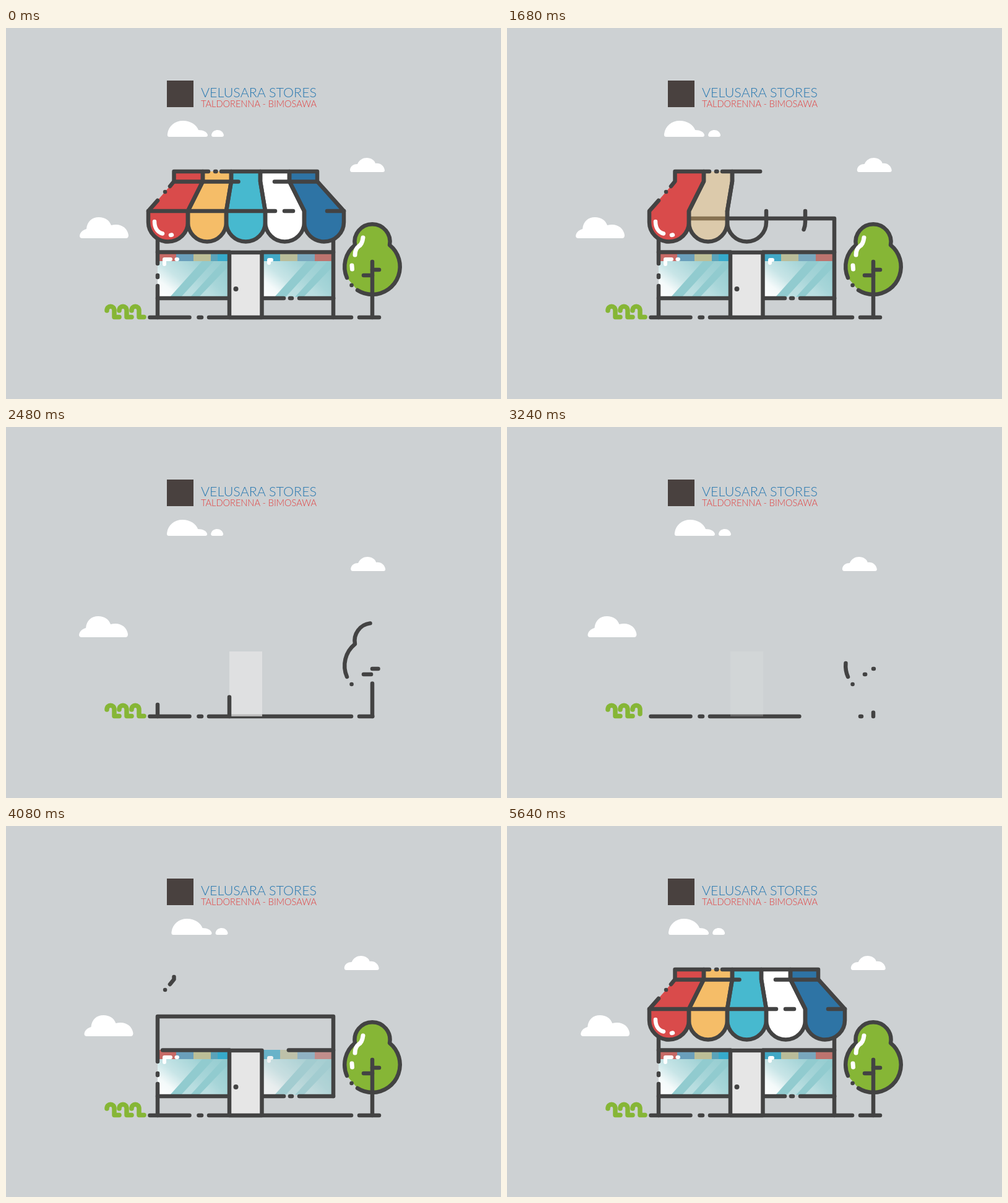
An HTML page that plays this animation: 800x600 px, repeating every 5680 ms.

```html
<!DOCTYPE html>
<html lang="en">
<head>
<meta charset="utf-8">
<title>Store front</title>
<style>
  html, body { margin: 0; width: 100%; height: 100%; overflow: hidden; background: #cdd1d3; }
  svg { display: block; width: 100%; height: 100%; }
  path { fill: none; stroke-linecap: round; stroke-linejoin: round; }
  text { font-family: Lato, "Open Sans", sans-serif; font-weight: 300; }
</style>
</head>
<body>
<svg id="stage" viewBox="0 0 800 600">
  <defs>
    <linearGradient id="shine" x1="0" y1="1" x2="1" y2="0">
      <stop offset="0" stop-color="#fff"/>
      <stop offset=".25" stop-color="#fff" stop-opacity=".9"/>
      <stop offset=".5" stop-color="#fff" stop-opacity=".5"/>
      <stop offset="1" stop-color="#fff" stop-opacity=".1"/>
    </linearGradient>
    <g id="glass">
      <rect width="113" height="73" fill="#91cbcf"/>
      <path d="M0 73V15H72L20 73Z" style="fill:url(#shine)"/>
      <path d="M38 73L91 15H106L53 73Z" style="fill:url(#shine)" opacity=".4"/>
      <path d="M67 73L113 25V73Z" style="fill:url(#shine)" opacity=".4"/>
    </g>
  </defs>
  <rect x="260" y="85" width="43" height="43" fill="#49413f"/>
  <text x="315" y="112" font-size="21.5" fill="#2878b0">VELUSARA STORES</text>
  <text x="315" y="128" font-size="14.6" fill="#e23b3b">TALDORENNA - BIMOSAWA</text>
</svg>
<script>
const LOOP = 5680;
const INK = "#434343", GREEN = "#86b636";
const stage = document.getElementById("stage");
const parts = [];
const clamp = x => Math.max(0, Math.min(1, x));

function make(tag, attrs, parent = stage) {
  const el = document.createElementNS("http://www.w3.org/2000/svg", tag);
  for (const key in attrs) el.setAttribute(key, attrs[key]);
  parent.appendChild(el);
  return el;
}

const shape = (d, color) => make("path", { d, style: "fill:" + color });

// Fades an element in over a span of build time.
function fade(el, start, span) {
  parts.push(b => el.setAttribute("opacity", clamp((b - start) / span)));
  return el;
}

// Draws pen strokes one after another over a span of build time.
function draw(list, start, span, color = INK, width = 6.5) {
  const lines = list.map(d => make("path", { d, stroke: color, "stroke-width": width }));
  const sizes = lines.map(l => l.getTotalLength());
  const total = sizes.reduce((a, n) => a + n, 0);
  parts.push(b => {
    let left = clamp((b - start) / span) * total + 0.001;
    const hidden = b <= start;
    lines.forEach((line, i) => {
      const size = sizes[i], part = Math.min(left, size);
      line.style.display = hidden || part <= 0 ? "none" : "";
      line.style.strokeDasharray = part >= size ? "none" : part + " 2000";
      left -= size;
    });
  });
}

// Clouds
const clouds = [
  [-0.0041, "M264 176Q260 176 261 171C263 158 273 150 286 150C299 150 308 157 311 165C319 165 325 168 326 173Q326 176 323 176Z" +
    "M335 176Q332 176 332 173C333 167 338 165 342 165C347 165 351 168 352 173Q352 176 349 176Z"],
  [0.0058, "M559 233Q556 233 556 229C557 223 562 220 568 220C571 213 577 210 583 210C590 210 596 214 597 219C605 218 611 223 612 230Q612 233 609 233Z"],
  [-0.0047, "M123 340Q119 340 119 336C120 330 124 327 130 325C131 313 139 306 150 306C160 306 167 311 170 319C184 315 196 322 198 335Q198 340 194 340Z"]
].map(([speed, d]) => ({ speed, el: shape(d, "#fff") }));

// Bush
draw([163, 183, 203].map(x => `M${x} 457C${x} 448 ${x + 12} 448 ${x + 12} 457V467.5H${x + 20}`), 0, 290, GREEN, 7.5);

// Tree
const crown = "M551 404A45 45 0 0 1 564 351A28.5 28.5 0 1 1 620 351A45 45 0 0 1 592 431A45 45 0 0 1 568 424";
fade(shape(crown + "Z", GREEN), 500, 250);
draw(["M558.5 416h.1", crown], 218, 560);
draw(["M592 468V378"], 240, 300);
draw(["M578 400H592"], 245, 200);
draw(["M592 391H603"], 245, 200);
draw(["M571 468H603"], 245, 260);
draw(["M559.5 390L559 384", "M564 367C564 361 566 356 570 353C574 351 576 347 577 339"], 700, 250, "#fff", 7);

// Windows
function pane(x, blinds, glint, start, span) {
  const g = fade(make("g", {}), start, span);
  make("use", { href: "#glass", x, y: 362 }, g);
  blinds.forEach(([from, to, color]) =>
    make("rect", { x: from, y: 362, width: to - from, height: 15, fill: color }, g));
  make("path", { d: glint, stroke: "#fff", "stroke-width": 6 }, g);
}
pane(245, [[245, 275, "#c76a66"], [275, 303, "#6a9fbb"], [303, 331, "#bcbe97"], [331, 342, "#5ba3b9"], [342, 358, "#36aacb"]],
  "M256 382V374H266M275.5 374h1.5", 680, 300);
pane(414, [[414, 443, "#42a8c6"], [443, 471, "#b9bc99"], [471, 499, "#79a7bd"], [499, 527, "#bd746f"]],
  "M425 380V375H429", 880, 310);

// Walls and ground
draw(["M245 468V417", "M245 403V400", "M245 381V308H529V437"], 400, 500);
draw(["M529 437V468"], 1220, 150);
draw(["M361 437H245"], 550, 300);
draw(["M529 437H474", "M462 437H459", "M449 437H414"], 600, 300);
draw(["M361 362.5H245"], 715, 415);
draw(["M529 362.5H414"], 850, 400);
draw(["M232.5 468H296.5", "M311.5 468H316", "M328 468H558"], 0, 366);

// Door
fade(make("rect", { x: 361, y: 363, width: 53, height: 105, fill: "#e6e6e6" }), 200, 300);
draw(["M361 468V363H413.5V468Z"], 380, 380);
fade(make("circle", { cx: 371.5, cy: 422, r: 4, fill: INK }), 650, 60);

// Awning
const high = [271.5, 318, 364, 411, 458, 503];
const low = [230, 294, 356, 419, 482, 546];
const begin = [1082, 1290, 1500, 1776, 1888];
const fillAt = [1490, 1720, 1930, 2100, 2200];
const cup = i => {
  const r = (low[i + 1] - low[i]) / 2;
  return `V314A${r} 31.5 0 0 1 ${low[i]} 314V296`;
};

["#d94b4b", "#f5bd68", "#47b9cf", "#fff", "#2e74a5"].forEach((color, i) => {
  const d = `M${low[i + 1]} 296${cup(i)}L${high[i]} 248V232H${high[i + 1]}V248Z`;
  fade(shape(d, color), fillAt[i], 250);
});

begin.forEach((start, i) => {
  const rise = `M${low[i + 1]} 296${cup(i)}L${high[i]} 248V232`;
  const fall = `H${high[i + 1]}V248L${low[i + 1]} 296`;
  const lines = i === 0
    ? ["M257 265h.1", `M265 256L271.5 248V232${fall}${cup(0)}L245 279`]
    : i === 1
      ? [rise + "H327", "M338 232h1.5", "M348 232" + fall]
      : [rise + fall];
  draw(lines, start, 400);
});
draw(["M271.5 248.5H375.5"], 2050, 300);
draw(["M503 248.5H434"], 2100, 300);
draw(["M230 296H435", "M450 296H464"], 2050, 400);
draw(["M546 296H519"], 2200, 230);
draw(["M268 334.5L266 335", "M253 332.5C244 330 240 322 240 313"], 1200, 250, "#fff", 6.5);

// Piecewise map from loop time to build time: hold, take down, rest, build up.
const plan = [[0, 2700], [1240, 2480], [2080, 1212], [2500, 380], [2700, 0], [2980, 0], [LOOP, 2700]];
function buildTime(t) {
  const i = plan.findIndex(p => t < p[0]);
  const [t0, b0] = plan[i - 1], [t1, b1] = plan[i];
  return b0 + (b1 - b0) * (t - t0) / (t1 - t0);
}

// Steady drift with a quick eased return.
function drift(t) {
  if (t < 2100) return t;
  if (t > 2980) return t - LOOP;
  const k = (1 - Math.cos(Math.PI * (t - 2100) / 880)) / 2;
  return 2100 - 4800 * k;
}

let origin = null;
function frame() {
  const now = performance.now();
  if (origin === null) origin = now;
  const t = (now - origin) % LOOP;
  const b = buildTime(t), s = drift(t);
  parts.forEach(update => update(b));
  clouds.forEach(c => c.el.setAttribute("transform", `translate(${c.speed * s} 0)`));
  requestAnimationFrame(frame);
}
frame();
</script>
</body>
</html>
```
